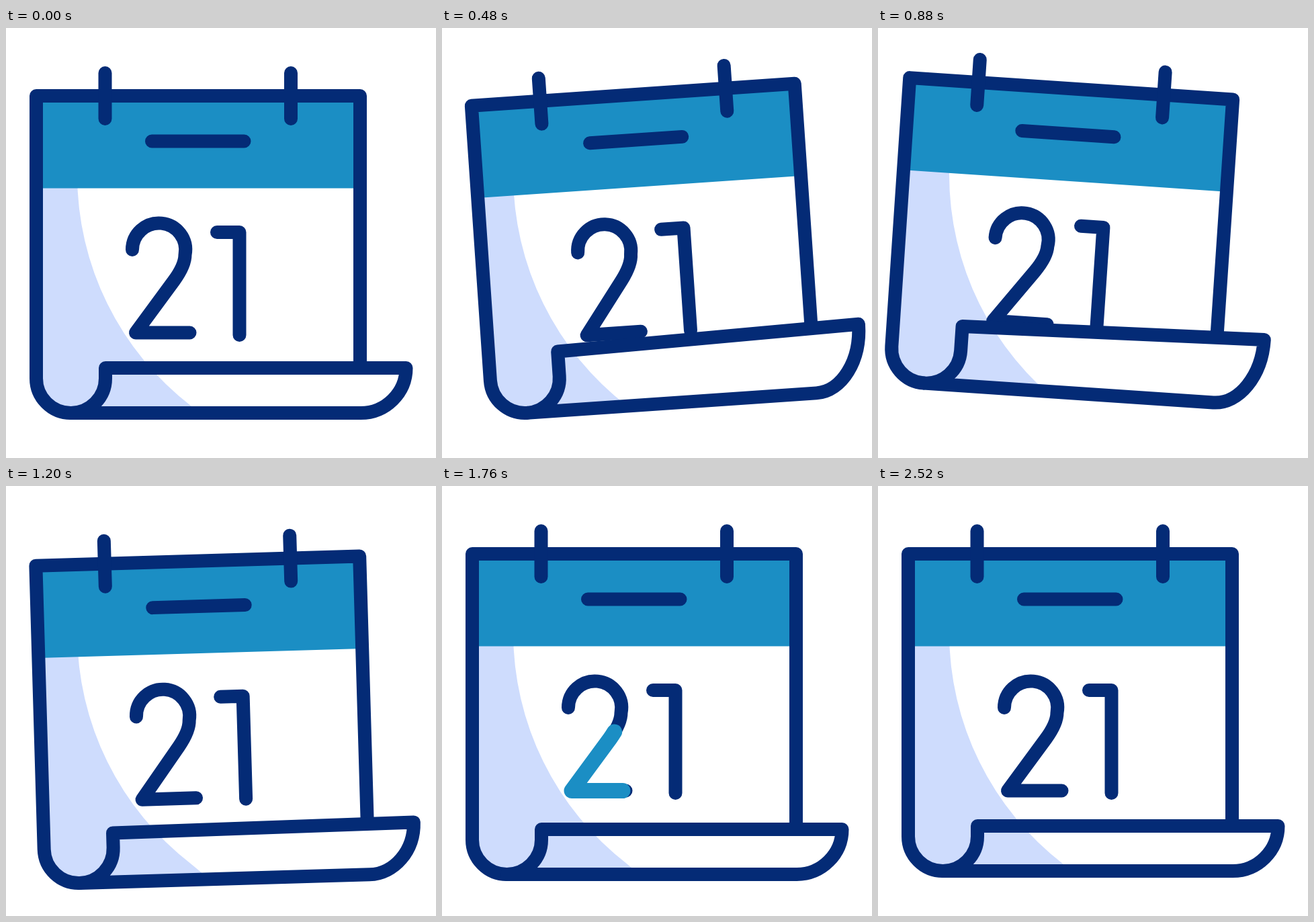
Write an HTML page with a canvas that moves like this. It is 640 px wide and 640 px high and loops after 2.88 s.

```html
<!DOCTYPE html>
<html lang="en">
<head>
<meta charset="utf-8">
<title>Calendar</title>
<style>
  html, body { margin: 0; width: 100%; height: 100%; overflow: hidden; background: #fff; }
  canvas { display: block; }
</style>
</head>
<body>
<canvas id="stage" width="640" height="640"></canvas>
<script>
const ctx = document.getElementById('stage').getContext('2d');
const NAVY = '#042b76', TEAL = '#1b8ec4', PALE = '#cedcfd', WHITE = '#fff';
const LOOP = 2880, STEP = 40, LAST = 2520;
const PIVOT = { x: 286, y: 126 };

const ramp = (t, from, to) => Math.min(1, Math.max(0, (t - from) / (to - from)));
const smooth = (t, from, to) => {
  const u = ramp(t, from, to);
  return u * u * (3 - 2 * u);
};
const sineOut = (t, from, to) => Math.sin(ramp(t, from, to) * Math.PI / 2);

// Swing left, swing right, then a half swing back to rest (degrees).
const tilt = t => -3.95 * smooth(t, 20, 465) + 7.87 * smooth(t, 465, 905)
  - 5.82 * smooth(t, 905, 1240) + 1.9 * smooth(t, 1240, 1620);

// Dip, jump, land low and settle.
const bounce = t => 20 * smooth(t, 0, 330) - 58 * smooth(t, 330, 690)
  + 63 * smooth(t, 655, 1150) - 25 * smooth(t, 1090, 1290);

// Extra length of the sheet.
const stretch = t => 24.5 * smooth(t, 0, 320) - 69.5 * smooth(t, 320, 640)
  + 50 * sineOut(t, 640, 1360) - 5 * smooth(t, 1720, 2480);

// How far the curled flap is open, from 0 to 1.
const opening = t => smooth(t, 320, 640) * (1 - ramp(t, 640, 1820)) ** 3;

const shade = new Path2D('M0 0H106V218A435 435 0 0 0 276 563L340 616V640H0Z');
const header = new Path2D('M45 101H527V238.5H45Z');
const bars = new Path2D('M147.5 67V135M424 67V135M217 168.5H354.5');
const digits = [
  { path: new Path2D('M188 330A39.6 39.6 0 1 1 266.5 337.5C266.5 350 258 365 250 376L193 453.5H273.5'), length: 350 },
  { path: new Path2D('M314 304H347.5V457'), length: 186.5 }
];
const inkLength = digits[0].length + digits[1].length;

function stroke(path, color = NAVY, width = 20) {
  ctx.strokeStyle = color;
  ctx.lineWidth = width;
  ctx.stroke(path);
}

function fill(path, color) {
  ctx.fillStyle = color;
  ctx.fill(path);
}

// The shadow edge stays still on the stage while the paper swings.
function fillShaded(path, pose) {
  fill(path, WHITE);
  ctx.save();
  ctx.resetTransform();
  ctx.clip(shade);
  pose();
  fill(path, PALE);
  ctx.restore();
}

// A teal glint runs along both digits, one after the other.
function drawDigits(t) {
  const head = inkLength * ramp(t, 1240, 2046);
  const tail = inkLength * ramp(t, 1440, 2500);
  let start = 0;
  for (const { path, length } of digits) {
    stroke(path);
    const a = Math.max(0, tail - start), b = Math.min(length, head - start);
    if (b > a) {
      ctx.setLineDash([b - a, 2000]);
      ctx.lineDashOffset = -a;
      stroke(path, TEAL, 23);
      ctx.setLineDash([]);
    }
    start += length;
  }
}

function draw(t) {
  const angle = tilt(t) * Math.PI / 180, dy = bounce(t);
  const drop = stretch(t), open = opening(t);
  const bottom = 573 + drop, tube = bottom - 51.5;
  const left = 506 + drop - 42 * open, right = 506 + drop - 62 * open;
  const tip = 595.5 + 4 * open;
  const bendX = 528 + (tip - 528) * 0.55, bendY = right + (bottom - right) * 0.55;

  const pose = () => {
    ctx.translate(PIVOT.x, PIVOT.y + dy);
    ctx.rotate(angle);
    ctx.translate(-PIVOT.x, -PIVOT.y);
  };
  const page = new Path2D(`M45 101H527V${right}L148 ${left}V${tube}A51.5 51.5 0 0 1 45 ${tube}Z`);
  const frame = new Path2D(`M527 ${right}V101H45V${tube}A51.5 51.5 0 0 0 96.5 ${bottom}`);
  const flap = new Path2D(`M148 ${left}L${tip} ${right}
    C${tip} ${bendY} ${bendX} ${bottom} 528 ${bottom}
    H96.5A51.5 51.5 0 0 0 148 ${tube}Z`);

  ctx.resetTransform();
  ctx.clearRect(0, 0, 640, 640);
  ctx.lineCap = ctx.lineJoin = 'round';
  pose();
  fillShaded(page, pose);
  fill(header, TEAL);
  drawDigits(t);
  stroke(frame);
  fillShaded(flap, pose);
  stroke(flap);
  stroke(bars);
}

function tick() {
  const t = performance.now() % LOOP;
  draw(Math.min(LAST, Math.floor(t / STEP) * STEP));
  requestAnimationFrame(tick);
}
tick();
</script>
</body>
</html>
```
